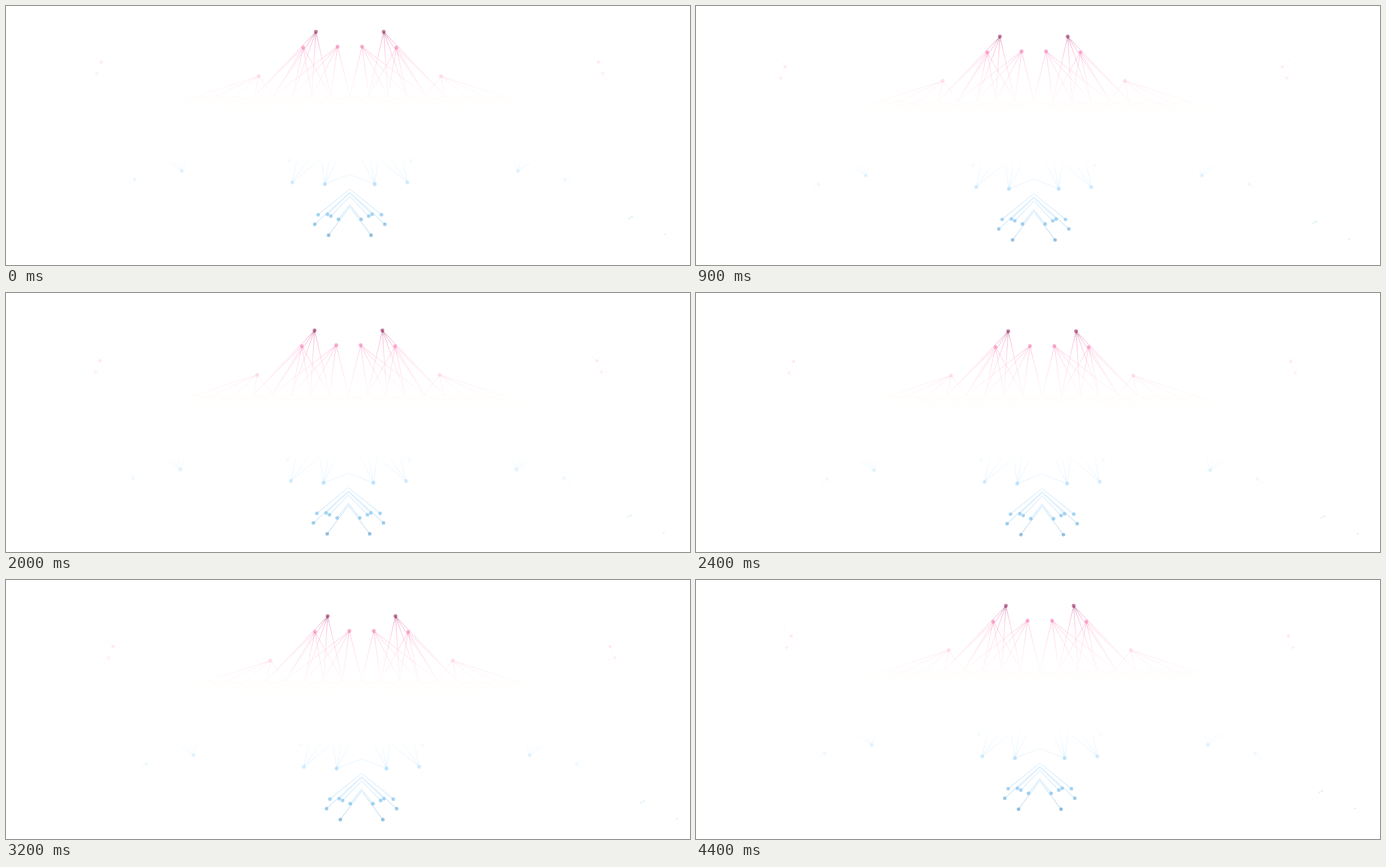
Write an HTML page with a canvas that moves like this. It is 1214 by 461 pixels and loops after 4.5 s.

```html
<!DOCTYPE html>
<html lang="en">
<head>
<meta charset="utf-8">
<title>Drifting network</title>
<style>
  html, body { margin: 0; width: 100%; height: 100%; overflow: hidden; background: #fff; }
  canvas { display: block; }
</style>
</head>
<body>
<canvas id="stage" width="1214" height="461"></canvas>
<script>
const canvas = document.getElementById('stage');
const ctx = canvas.getContext('2d');
const AXIS = 610.2, STEP = 100, LOOP = 4500, LEG = 1100;

// The whole drawing drifts around this closed path, one leg per LEG ms.
const path = [[0, 0], [-13, 10.2], [0, 23], [23, 18], [0, 0]];

// Colour depends only on height: crimson, pink, cream, clear, sky, blue.
const TOP = 40, BOTTOM = 415;
const ink = ctx.createLinearGradient(0, TOP, 0, BOTTOM);
Object.entries({
  40: '#84204f', 50: '#a93370', 62: '#ed6aa7', 78: '#fb8abc', 100: '#ffb2d2',
  125: '#ffcfe0', 148: '#ffe8ec', 160: '#fff6f0', 175: '#fffcf6', 190: '#fffcf600',
  262: '#f2faff00', 280: '#dcf1ff', 316: '#b2dfff', 340: '#7cc4f8', 371: '#58b0ea', 412: '#3787c2'
}).forEach(([y, color]) => ink.addColorStop((y - TOP) / (BOTTOM - TOP), color));

// Key points of the left half; the right half is its mirror image.
const upper = [[550, 46], [527.5, 74], [588.5, 72.3], [448.5, 125]];
const lower = [[566, 317], [554, 371.5], [570.5, 370.8], [576.5, 374],
               [590, 379.7], [548, 388.5], [572.5, 408]];
const outer = [[169, 100], [161, 120], [228, 309]];
const FOCUS = [670, 277];
const HUBS = { count: 9, gap: 33.75, y: 160 };

function randomFrom(seed) {
  return () => (seed = (seed * 16807) % 2147483647) / 2147483647;
}

function line([x1, y1], [x2, y2], alpha) {
  ctx.globalAlpha = alpha;
  ctx.beginPath();
  ctx.moveTo(x1, y1);
  ctx.lineTo(x2, y2);
  ctx.stroke();
}

function node([x, y], alpha, radius = 3.4) {
  ctx.globalAlpha = alpha;
  ctx.beginPath();
  ctx.arc(x, y, radius, 0, Math.PI * 2);
  ctx.fill();
}

// Evenly spread lines rising from one node.
function fan([x, y], rise, first, gap, count, alpha = 0.8) {
  for (let i = 0; i < count; i++) {
    line([x, y], [x + first + gap * i, y - rise], alpha);
  }
  node([x, y], alpha * 0.7);
}

function scatter([x, y], count, spread, alpha, random) {
  ctx.globalAlpha = alpha;
  for (let i = 0; i < count; i++) {
    ctx.fillRect(x + (random() - 0.5) * spread, y + (random() - 0.5) * spread, 1, 1);
  }
}

function drawUpper() {
  for (let i = 0; i < HUBS.count; i++) {
    const hub = [AXIS - HUBS.gap * i, HUBS.y];
    for (const point of upper) {
      const dx = hub[0] - point[0];
      if (dx > -115 && dx < 50) line(point, hub, 0.9);
    }
    // Pale web hanging below the hubs.
    for (let k = -3; k <= 3; k++) line(hub, [hub[0] + k * HUBS.gap, 185], 0.6);
  }
  upper.forEach(point => node(point, 0.6));
}

function drawLower() {
  for (const point of lower) {
    line(point, FOCUS, 0.75);
    node(point, 0.5, 3.2);
  }
  fan([566, 317], 55, -8, 18, 3);
  fan([508, 314], 52, 11, 26, 3);
  fan([502, 275.5], 13, -6, 12, 3, 0.5);
  fan([312, 293.5], 21, -32, 13, 4, 0.7);
}

function drawOuter() {
  const random = randomFrom(77);
  for (const point of outer) {
    node(point, 0.25, 3);
    scatter([point[0] + 4, point[1]], 6, 32, 0.5, random);
  }
}

// One half is clipped at the axis, so lines that cross it meet their mirror image.
function drawHalf() {
  ctx.save();
  ctx.beginPath();
  ctx.rect(-100, 0, AXIS + 100, 461);
  ctx.clip();
  drawUpper();
  drawLower();
  drawOuter();
  ctx.restore();
}

function offsetAt(time) {
  const leg = Math.min(Math.floor(time / LEG), path.length - 2);
  const part = Math.min(time / LEG - leg, 1);
  return path[leg].map((from, i) => from + (path[leg + 1][i] - from) * part);
}

function frame() {
  const time = Math.floor((performance.now() % LOOP) / STEP) * STEP;
  ctx.setTransform(1, 0, 0, 1, 0, 0);
  ctx.clearRect(0, 0, canvas.width, canvas.height);
  ctx.translate(...offsetAt(time));
  ctx.strokeStyle = ctx.fillStyle = ink;
  ctx.setLineDash([1.7, 1.1]);
  scatter([1109, 377], 4, 7, 0.8, randomFrom(5));
  scatter([1169.5, 406], 1, 0, 0.9, randomFrom(1));
  drawHalf();
  ctx.translate(2 * AXIS, 0);
  ctx.scale(-1, 1);
  drawHalf();
  requestAnimationFrame(frame);
}
frame();
</script>
</body>
</html>
```
